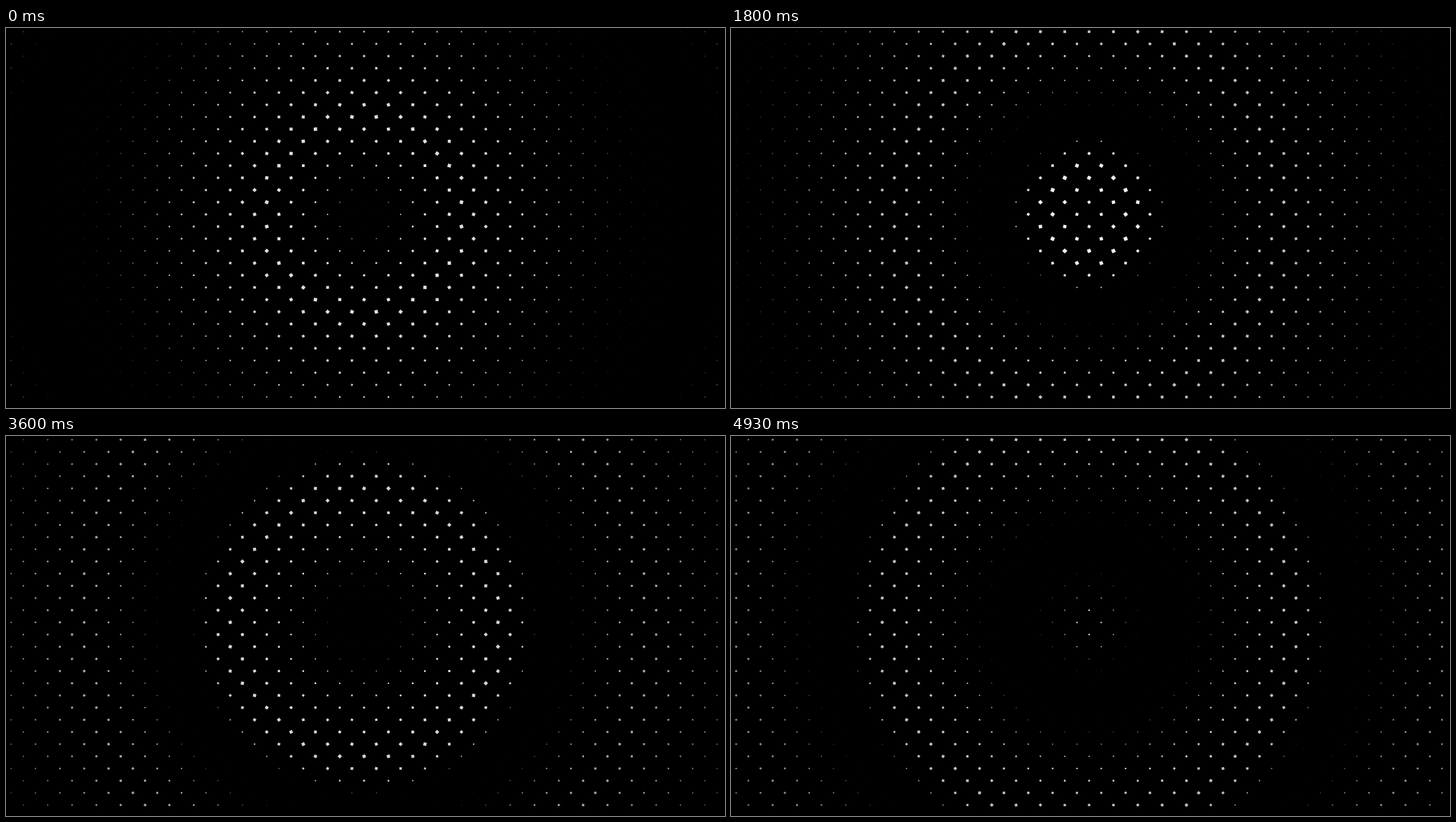
These frames come from a looping animation (1030x544 px, 4.99 s). An HTML page with a canvas:

```html
<!DOCTYPE html>
<html lang="en">
<head>
<meta charset="utf-8">
<title>Ripple grid</title>
<style>
  html, body { margin: 0; width: 100%; height: 100%; overflow: hidden; background: #000; }
  canvas { display: block; }
</style>
</head>
<body>
<canvas id="stage" width="1030" height="544"></canvas>
<script>
const ctx = document.getElementById('stage').getContext('2d');
const W = 1030, H = 544, CX = 513, CY = 266.8;
const PITCH = 17.433, LOOP = 4990, STEP = 200 / 3, SPEED = 74;

// start: crest radius at time zero; tail and front: reach inward and outward
const waves = [
  { start: 620, tail: 125, front: 300, soft: true },
  { start: 140, tail: 132, front: 350, soft: true },
  { start: -72, tail: 165, front: 58, soft: false },
  { start: -460, tail: 165, front: 200, soft: true }
];

function hash(a, b) {
  const s = Math.sin(a * 127.1 + b * 311.7) * 43758.5453;
  return s - Math.floor(s);
}

// Staggered lattice centred on the ripple origin
const dots = [];
for (let row = -15; row <= 15; row++) {
  for (let col = -29; col <= 29; col++) {
    if ((row + col) % 2 === 0) continue;
    const x = col * PITCH, y = row * PITCH, r = Math.hypot(x, y);
    const v = Math.round(255 - 0.22 * r);
    dots.push({
      x: CX + x, y: CY + y, r,
      size: 5.6 - 0.0055 * r,
      tilt: hash(row, col) * Math.PI / 2,
      fill: `rgb(${v},${v},${v})`
    });
  }
}

function level(wave, r, sec) {
  const d = r - wave.start - SPEED * sec;
  if (d <= -wave.tail || d >= wave.front) return 0;
  if (d < 0) return Math.pow(1 + d / wave.tail, 1.1);
  const u = d / wave.front;
  return wave.soft ? Math.pow(1 - u, 1.3) : 1 - Math.pow(u, 1.6);
}

function draw(ms) {
  const sec = Math.floor((ms % LOOP + 5) / STEP) * STEP / 1000;
  ctx.fillStyle = '#000';
  ctx.fillRect(0, 0, W, H);
  for (const dot of dots) {
    const side = dot.size * Math.max(...waves.map(w => level(w, dot.r, sec)));
    if (side < 0.15) continue;
    ctx.save();
    ctx.translate(dot.x, dot.y);
    ctx.rotate(dot.tilt);
    ctx.fillStyle = dot.fill;
    ctx.fillRect(-side / 2, -side / 2, side, side);
    ctx.restore();
  }
}

const origin = performance.now();
function tick() {
  draw(performance.now() - origin);
  requestAnimationFrame(tick);
}
tick();
</script>
</body>
</html>
```
